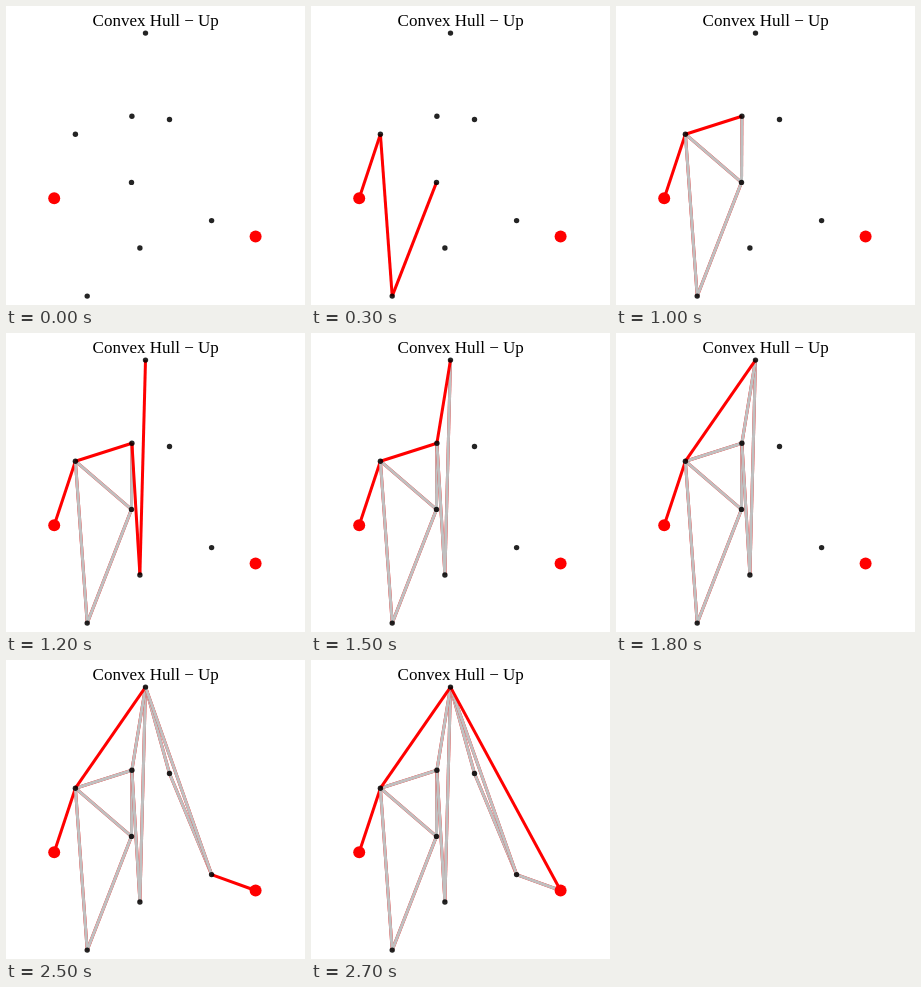
These frames come from a looping animation (299 by 299 pixels, 2800 ms). An HTML page with a canvas:

```html
<!DOCTYPE html>
<html>
<head>
<meta charset="utf-8">
<style>
  html, body { margin: 0; width: 100%; height: 100%; overflow: hidden; background: #fff; }
  canvas { display: block; }
</style>
</head>
<body>
<canvas id="stage" width="299" height="299"></canvas>
<script>
const ctx = document.getElementById('stage').getContext('2d');
const STEP = 100, LOOP = 2800;
const RED = '#ff0000', GRAY = '#c0c0c0', INK = 'rgba(0, 0, 0, 0.86)';

// Sorted by x; the first and last points are the extremes.
const points = [
  [48.2, 192.2], [69.4, 128.2], [81.2, 290.1], [125.5, 176.4], [125.9, 110.2],
  [133.9, 242], [139.5, 27.1], [163.5, 113.5], [205.6, 214.6], [249.6, 230.5]
];

const cross = (a, b, c) =>
  (b[0] - a[0]) * (c[1] - a[1]) - (b[1] - a[1]) * (c[0] - a[0]);

// Upper hull scan, recording one stroke per step.
function scan(pts) {
  const strokes = [], hull = [pts[0]];
  const add = (a, b, color) => strokes.push({ a, b, color });
  for (const p of pts.slice(1)) {
    add(hull[hull.length - 1], p, RED);
    while (hull.length > 1) {
      const [a, b] = hull.slice(-2);
      if (cross(a, b, p) > 0) break;
      add(a, b, GRAY);
      add(b, p, GRAY);
      add(a, p, RED);
      hull.pop();
    }
    hull.push(p);
  }
  return strokes;
}

const strokes = scan(points);

function line({ a, b, color }) {
  ctx.strokeStyle = color;
  ctx.beginPath();
  ctx.moveTo(...a);
  ctx.lineTo(...b);
  ctx.stroke();
}

function dot([x, y], r, color) {
  ctx.fillStyle = color;
  ctx.beginPath();
  ctx.arc(x, y, r, 0, Math.PI * 2);
  ctx.fill();
}

function draw(count) {
  ctx.fillStyle = '#fff';
  ctx.fillRect(0, 0, 299, 299);
  ctx.lineWidth = 3;
  strokes.slice(0, count).forEach(line);
  points.forEach((p, i) => {
    const end = i === 0 || i === points.length - 1;
    dot(p, end ? 6 : 2.7, end ? RED : INK);
  });
  ctx.fillStyle = '#000';
  ctx.font = '17px "Liberation Serif", serif';
  ctx.textAlign = 'center';
  ctx.fillText('Convex Hull − Up', 149.7, 20);
}

const start = performance.now();
function tick() {
  draw(Math.floor(((performance.now() - start) % LOOP) / STEP));
  requestAnimationFrame(tick);
}
draw(0);
requestAnimationFrame(tick);
</script>
</body>
</html>
```
